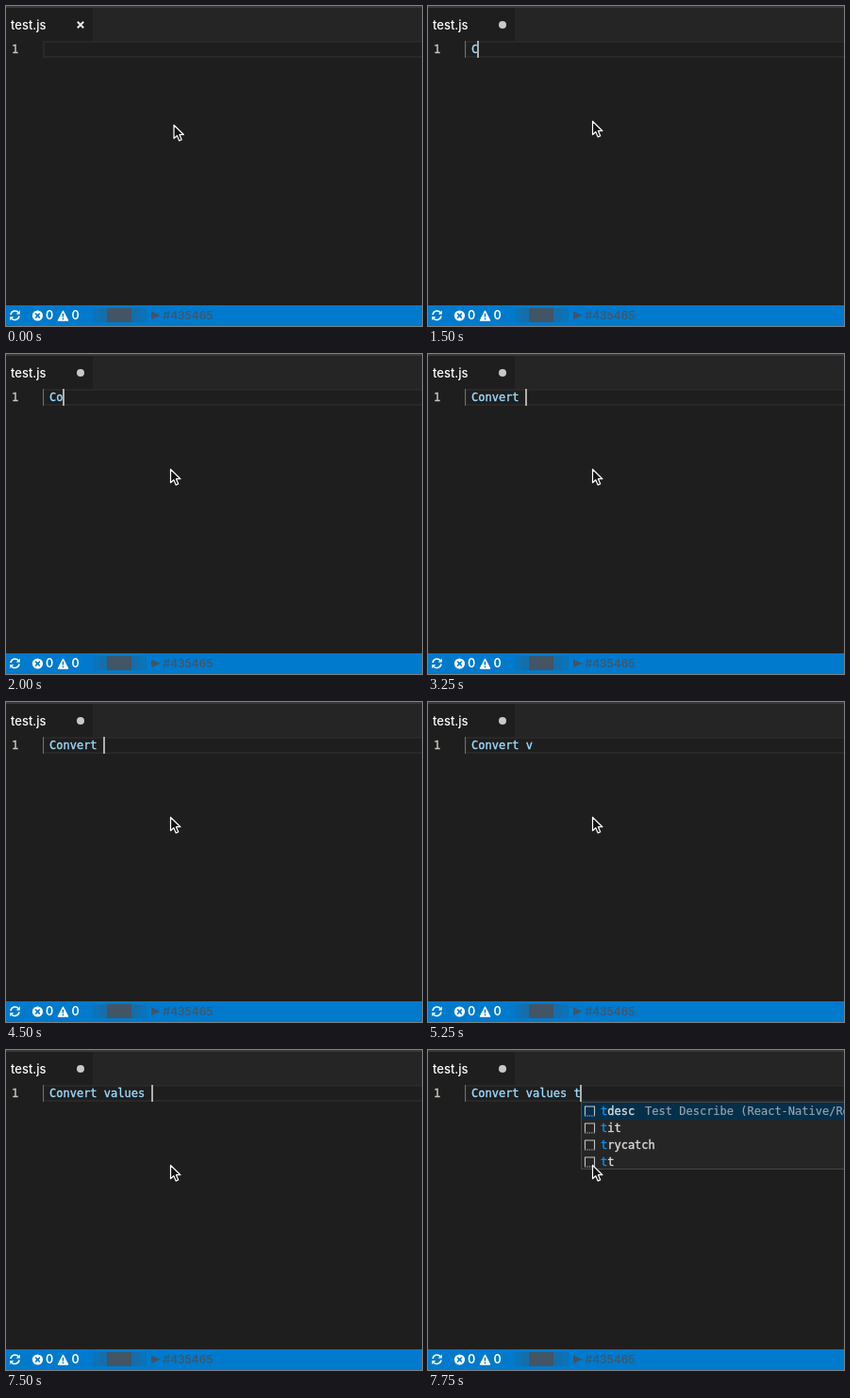
Write an HTML page that moves like this. It is 441 px wide and 340 px high and loops after 8 s.

```html
<!DOCTYPE html>
<html lang="en">
<head>
<meta charset="utf-8">
<title>Editor typing</title>
<style>
html, body { margin: 0; width: 100%; height: 100%; overflow: hidden; background: #1e1e1e; }
svg { display: block; width: 441px; height: 340px; }
text { white-space: pre; }
.ui { font-family: Inter, "Open Sans", sans-serif; }
.code { font: 12px "DejaVu Sans Mono", monospace; stroke-width: .35px; }
.key { fill: #9cdcfe; stroke: #9cdcfe; }
.num { fill: #cfc8bb; stroke: #cfc8bb; }
.label { fill: #dcdcdc; stroke: #dcdcdc; }
.hit { fill: #0097fb; stroke: #0097fb; }
.detail { fill: #97a5b0; stroke: #97a5b0; stroke-width: .15px; }
</style>
</head>
<body>
<svg viewBox="0 0 441 340" xmlns="http://www.w3.org/2000/svg">
  <rect width="441" height="340" fill="#1e1e1e"/>
  <rect width="441" height="37" fill="#252526"/>
  <rect width="92" height="37" fill="#1e1e1e"/>
  <rect width="441" height="2" fill="#383838"/>
  <text class="ui" x="5" y="25" font-size="13" font-weight="500" fill="#fff">test.js</text>
  <path id="close" d="M75.8 16.8l6.4 6.4m0-6.4l-6.4 6.4" stroke="#e8e8e8" stroke-width="2"/>
  <circle id="dirty" cx="79" cy="20" r="4" fill="#c8c8c8"/>

  <path d="M441 38H40V54H441" fill="none" stroke="#2c2c2c" stroke-width="1.6"/>
  <text class="code num" x="6" y="50">1</text>
  <rect id="guide" x="39" y="37" width="1" height="18" fill="#707070"/>
  <text id="line" class="code key" x="38.8" y="50"></text>
  <rect id="caret" y="37" width="2" height="18" fill="#aeafad"/>
  <g id="popup"></g>

  <g id="status">
    <rect y="318" width="441" height="22" fill="#007acc"/>
    <g fill="none" stroke="#fff" stroke-width="1.5">
      <path d="M5 328a4.7 4.7 0 0 1 8.4-2.2M14 329.4a4.7 4.7 0 0 1-8.4 2.2"/>
    </g>
    <path d="M14.8 323.4v4h-4zM4.2 334v-4h4z" fill="#fff"/>
    <circle cx="33.5" cy="329" r="5.6" fill="#fff"/>
    <path d="M31.2 326.7l4.6 4.6m0-4.6l-4.6 4.6" stroke="#007acc" stroke-width="1.7"/>
    <path d="M60.5 323.8l5.4 10.4h-10.8z" fill="#fff" stroke="#fff" stroke-linejoin="round"/>
    <path d="M60.5 326.8v3.6m0 1.2v1.6" stroke="#007acc" stroke-width="1.5"/>
    <g class="ui" font-size="12.5" font-weight="600" fill="#fff">
      <text x="42" y="333">0</text>
      <text x="69.5" y="333">0</text>
    </g>
    <g fill="#435465">
      <rect x="92" y="321" width="57" height="15" opacity=".18"/>
      <rect x="99" y="321" width="43" height="15" opacity=".16"/>
      <rect x="107" y="321" width="26" height="15"/>
      <path d="M154 324.3l9.5 4.5-9.5 4.5z"/>
      <text class="ui" x="166.5" y="333" font-size="12" font-weight="500">#435465</text>
    </g>
  </g>

  <path id="mouse" d="M0 0V14.2L3.3 11.2L5.6 16.6L8.2 15.5L5.9 10.2H10.4Z" fill="#111" stroke="#fff" stroke-width="1.2" stroke-linejoin="round"/>
</svg>
<script>
const NS = "http://www.w3.org/2000/svg";
const LOOP = 8000, CHAR = 7.224, ROW = 18;
const $ = id => document.getElementById(id);
const show = (id, on) => $(id).setAttribute("visibility", on ? "visible" : "hidden");

const snippets = "(React-Native/React/Redux snippets for es6/es7)";
const lists = {
  c: ["cas", "ccl", "cco", "cdi", "cdm", "cdup", "cer", "cge", "cgr", "cin", "clg", "class"],
  t: ["tdesc", "tit", "trycatch", "tt"]
};
const details = { c: "Console Assert", t: "Test Describe" };

// time, typed text, caret on, open suggestion list
const steps = [
  [0, "", 0],
  [250, "", 1],
  [750, "", 0],
  [1000, " ", 1],
  [1500, " C", 1],
  [1750, " C", 1, "c"],
  [2000, " Co", 1],
  [2250, " Con", 1],
  [2500, " Conve", 1],
  [2750, " Conver", 1],
  [3000, " Convert", 1],
  [3250, " Convert ", 1],
  [3750, " Convert ", 0],
  [4000, " Convert v", 1],
  [4500, " Convert ", 1],
  [4750, " Convert v", 1],
  [5250, " Convert v", 0],
  [5750, " Convert va", 1],
  [6250, " Convert va", 0],
  [6500, " Convert val", 1],
  [6750, " Convert valu", 1],
  [7000, " Convert value", 1],
  [7250, " Convert values", 1],
  [7500, " Convert values ", 1],
  [7750, " Convert values t", 1, "t"]
];

function add(parent, tag, attrs, text) {
  const el = document.createElementNS(NS, tag);
  for (const k in attrs) el.setAttribute(k, attrs[k]);
  if (text) el.textContent = text;
  parent.appendChild(el);
  return el;
}

function drawPopup(key, x) {
  const box = $("popup");
  box.replaceChildren();
  if (!key) return;
  const items = lists[key];
  add(box, "rect", { x: x + .5, y: 55.5, width: 430, height: items.length * ROW - 1,
    fill: "#252526", stroke: "#454545" });
  add(box, "rect", { x: x + 1, y: 56, width: 429, height: ROW, fill: "#062f4a" });
  items.forEach((name, i) => {
    const y = 56 + i * ROW;
    add(box, "path", { d: `M${x + 4.5} ${y + 13.5}v-9.5h10v9.5`, fill: "none",
      stroke: "#c5c5c5", "stroke-width": 1.1 });
    add(box, "path", { d: `M${x + 4} ${y + 14}h11`, stroke: "#c5c5c5",
      "stroke-width": 1.2, "stroke-dasharray": "1.2 1.2" });
    const left = x + 21, base = y + 13;
    add(box, "text", { class: "code hit", x: left, y: base }, name[0]);
    add(box, "text", { class: "code label", x: left + CHAR, y: base }, name.slice(1));
    if (!i) add(box, "text", { class: "code detail", x: left + name.length * CHAR + 11, y: base },
      details[key] + " " + snippets);
  });
}

let last = null;

function draw(time) {
  const step = steps.findLast(s => s[0] <= time);
  if (step === last) return;
  last = step;
  const [at, typed, caret, list] = step;
  const x = Math.max(39, Math.floor(38.5 + typed.length * CHAR));
  $("line").textContent = typed;
  $("caret").setAttribute("x", x);
  show("caret", caret);
  show("guide", at >= 1500);
  show("close", at < 1000);
  show("dirty", at >= 1000);
  $("mouse").setAttribute("transform", at ? "translate(174.5 122.5)" : "translate(178 126.5)");
  drawPopup(list, x + 1);
}

const start = performance.now();
function tick() {
  draw((performance.now() - start) % LOOP);
  requestAnimationFrame(tick);
}
tick();
</script>
</body>
</html>
```
